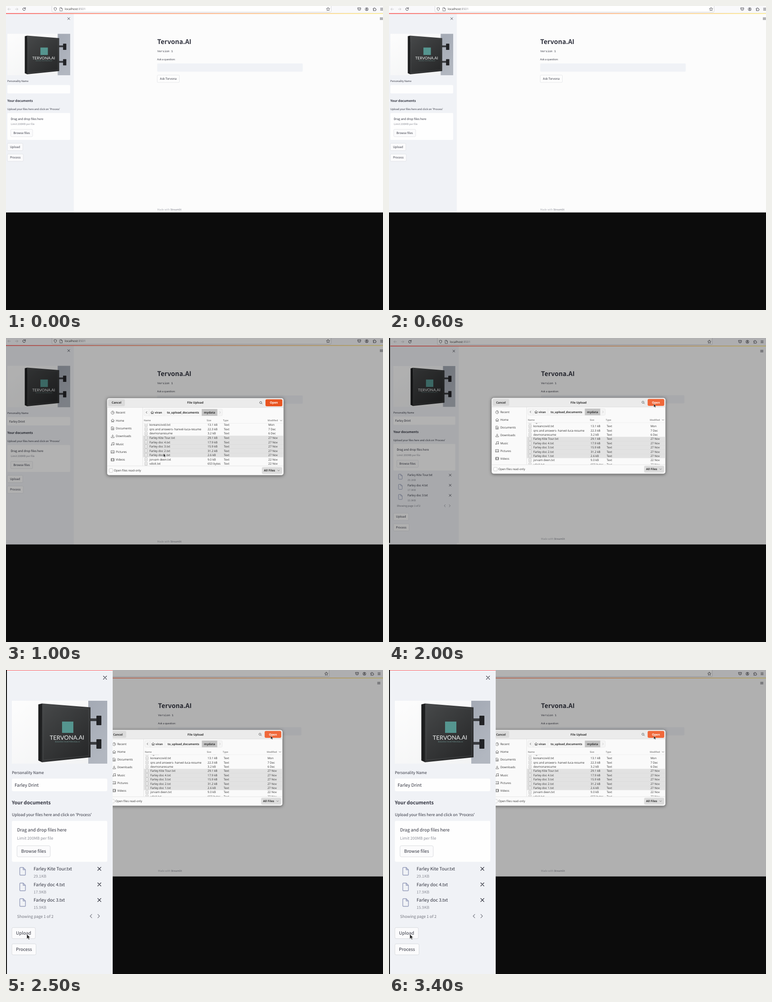
An HTML page that plays this animation: 834x672 px, repeating every 4 s.

```html
<!DOCTYPE html>
<html lang="en">
<head>
<meta charset="utf-8">
<title>File upload demo</title>
<style>
html, body { margin: 0; width: 100%; height: 100%; overflow: hidden; background: #0c0c0c; }
#stage { display: block; width: 834px; height: 672px; text-rendering: geometricPrecision; }
text { fill: #31333f; }
.app { font-family: "Noto Sans CJK JP", "Noto Sans CJK SC", "Noto Sans CJK KR", "Noto Sans CJK TC", "Noto Sans CJK", "Open Sans", sans-serif; }
.sys { font-family: "Open Sans", "Noto Sans", sans-serif; fill: #2e2e2e; }
.mono { font-family: "Liberation Mono", "Noto Sans Mono", monospace; }
.sign { font-family: Lato, "Open Sans", sans-serif; }
.line { fill: none; stroke-linecap: round; stroke-linejoin: round; }
.dialog { filter: drop-shadow(0 1px 3.5px rgba(0,0,0,.5)); }
</style>
</head>
<body>
<svg id="stage" viewBox="0 0 834 672"></svg>
<script>
const INK = '#31333f', GREY = '#8d8f98', BLACK = '#0c0c0c';

const rect = (x, y, w, h, fill, r = 0, more = '') =>
  `<rect x="${x}" y="${y}" width="${w}" height="${h}" rx="${r}" fill="${fill}" ${more}/>`;
const line = (d, stroke = INK, w = 1) =>
  `<path class="line" d="${d}" stroke="${stroke}" stroke-width="${w}"/>`;
const text = (cls, x, y, size, str, more = '') =>
  `<text class="${cls}" x="${x}" y="${y}" font-size="${size}" ${more}>${str}</text>`;
const app = (...a) => text('app', ...a);
const sys = (...a) => text('sys', ...a);
const at = (x, y, s, body) => `<g transform="translate(${x} ${y}) scale(${s})">${body}</g>`;
const ink = c => `style="fill:${c}"`;
const BOLD = 'font-weight="700"';
const MID = BOLD + ' text-anchor="middle"';

const cross = (x, y, r) => line(`M${x - r} ${y - r}l${2 * r} ${2 * r}m0 ${-2 * r}l${-2 * r} ${2 * r}`, INK, 1.3);
const chevron = (x, y, dx, color, w = 1) =>
  line(`M${x - dx} ${y - 2 * Math.abs(dx)}L${x + dx} ${y}L${x - dx} ${y + 2 * Math.abs(dx)}`, color, w);
const down = (x, y) => line(`M${x - 2} ${y - 1}l2 2l2 -2`, '#555', .7);
const cursor = (x, y, s) => at(x, y, s,
  '<path d="M0 0V10.5L2.5 8.3L4.2 12L6 11.2L4.4 7.6H7.6Z" fill="#222" stroke="#eee" stroke-width=".7"/>');

const files = [
  ['Farley Kite Tour.txt', '29.1', '27 Nov'],
  ['Farley doc 4.txt', '17.9', '27 Nov'],
  ['Farley doc 3.txt', '15.9', '27 Nov'],
  ['Farley doc 2.txt', '31.2', '27 Nov'],
  ['Farley doc 1.txt', '2.6', '27 Nov']
];
const listing = [
  ['log.txt', '4.1 kB', 'Mon'],
  ['koreancovid.txt', '13.1 kB', 'Mon'],
  ['qns and answers- hanvel-luca-resume', '22.3 kB', '7 Dec'],
  ['devmonaresume', '3.2 kB', '6 Dec'],
  ...files.map(([n, s, d]) => [n, s + ' kB', d]),
  ['jorvam deen.txt', '9.0 kB', '22 Nov'],
  ['vdoit.txt', '653 bytes', '22 Nov']
];

function photo() {
  return rect(13, 68, 211, 139, 'url(#paper)') +
    rect(182, 68, 42, 139, 'url(#wall)') +
    [101, 153].map(y => rect(184, y + 6, 18, 6, '#3a3c40') + rect(200, y, 11, 21, '#222326', 1)).join('') +
    '<path d="M71.5 76L80 74V204L71.5 200Z" fill="#1d1e1f"/>' +
    '<path d="M80 74L187 82.5V193L79 204Z" fill="url(#face)"/>' +
    line('M84 79L183 86.5V189.500L83 199Z', '#4b4d4f', .8) +
    rect(124, 114, 25, 25, '#55958f') +
    text('sign', 135, 154, 13, 'TERVONA.AI', `text-anchor="middle" ${ink('#f2f4f4')} transform="rotate(-.5 135 154)"`) +
    text('sign', 136, 159.5, 3.9, 'BUILDING YOUR PERSONAL AI', `text-anchor="middle" ${ink('#6f9793')}`);
}

const button = (x, y, w, label) =>
  rect(x, y, w, 24.5, '#fbfbfc', 3, 'stroke="#d5d7dc" stroke-width=".9"') + app(x + 9, y + 15.6, 9.9, label);

function sidebar(name, uploaded) {
  const shift = uploaded ? 0 : -134;
  let s = rect(2, -1, 234, 680, '#f0f2f6') + cross(219, 17, 3.6) + photo() +
    app(13, 229.9, 8.6, 'Personality Name') +
    rect(13, 240, 211, 28, '#fefefe', 3) + app(19, 257.8, 9.9, name) +
    app(13, 296.7, 10.75, 'Your documents', BOLD) +
    app(13, 323.1, 8.7, "Upload your files here and click on 'Process'") +
    rect(13, 333.5, 211, 90.5, '#fefefe', 3) +
    app(24.5, 356.8, 9.9, 'Drag and drop files here') +
    app(24.5, 374.6, 8.7, 'Limit 200MB per file', ink(GREY)) +
    button(24.4, 388.5, 73.5, 'Browse files');
  if (uploaded) {
    files.slice(0, 3).forEach(([n, size], i) => {
      const y = 439.5 + i * 34.5;
      s += line(`M32 ${y - 3}h6l5 5v10.5q0 1.5 -1.5 1.5h-9.5q-1.5 0 -1.5 -1.5v-14q0 -1.5 1.5 -1.5M38 ${y - 3}v5h5`, '#939bb9', 1.4) +
        app(61, y + 3.7, 9.9, n) +
        app(61, y + 19.6, 8.7, size + 'KB', ink(GREY)) + cross(206.5, y, 3.5);
    });
    s += app(24.5, 547.6, 8.7, 'Showing page 1 of 2', ink('#73757f')) +
      chevron(188, 544, -1.9, '#73757f', 1.1) + chevron(205, 544, 1.9, '#73757f', 1.1);
  }
  return s + button(13, 569.3 + shift, 52, 'Upload') + button(13, 605.3 + shift, 53.5, 'Process');
}

function toolbar() {
  const dark = '#3d3d45', pale = '#c2c2c6';
  return rect(-4.2, -6, 860, 21.8, '#f9f9fb') + rect(-4.2, 15.2, 860, .6, '#e6e6ea') +
    rect(101.7, -6, 617.5, 19.5, '#fff', 2, 'stroke="#c4c4ca" stroke-width=".7"') +
    line('M10 7H4m2.5 -2.5L4 7l2.5 2.5M20.5 7h6m-2.5 -2.5l2.5 2.5l-2.5 2.5', pale, .9) +
    line('M42.5 5.2A3 3 0 1 0 43 7.5M43 3.5v2.2h-2.3', dark) +
    line('M109 3.6l2.8 1q.2 4.2 -2.8 6q-3 -1.8 -2.8 -6Z', dark, .8) +
    line('M119.5 3.8h3l2 2v5h-5ZM122.3 3.8v2.2h2.2', dark, .7) +
    sys(130, 9.4, 6.85, 'localhost<tspan fill="#8a8a90">:8501</tspan>') +
    line('M712.5 3.2l1.15 2.4l2.6 .35l-1.9 1.8l.5 2.6l-2.35 -1.25l-2.35 1.25l.5 -2.6l-1.9 -1.8l2.6 -.35Z', dark, .8) +
    line('M778.3 4h6.4v2.5a3.2 3.2 0 0 1 -6.4 0ZM780 6l1.5 1.5l1.5 -1.5', dark, .9) +
    `<circle cx="798" cy="7" r="3.4" fill="none" stroke="${dark}" stroke-width=".8"/><circle cx="798" cy="6" r="1.3" fill="${dark}"/>` +
    line('M796 9q2 -1.8 4 0', dark) +
    line('M812.5 5.3h1.7a1 1 0 1 1 1.6 0h1.9v1.9a1 1 0 1 1 0 1.6v1.7h-5.2v-1.9a1 1 0 1 0 0 -1.5Z', dark, .8) +
    line('M828.3 4.7h5.4m-5.4 2.3h5.4m-5.4 2.3h5.4', dark, .8);
}

function page(name, uploaded) {
  return rect(-4.2, -6, 860, 475, '#fcfcfc') +
    at(-5.56, 16.7, .6588, sidebar(name, uploaded)) + toolbar() +
    rect(-4.2, 15.9, 860, 1.5, 'url(#rainbow)') +
    line('M827.4 26h6m-6 2h6m-6 2h6', '#55575f', .9) +
    app(334.6, 83.8, 14.25, 'Tervona.AI', BOLD) +
    text('mono', 334.8, 102, 6.4, 'Version 1') +
    app(334.6, 120.2, 5.73, 'Ask a question:') +
    rect(334.5, 127, 322, 18.2, '#f0f2f6', 1.8) +
    rect(334.5, 152.7, 49, 16.2, '#fdfdfd', 2, 'stroke="#d5d7dc" stroke-width=".6"') +
    app(359, 163.1, 6.5, 'Ask Tervona', 'text-anchor="middle"') +
    app(334.6, 451.6, 5.73, 'Made with <tspan fill="#7c7e88" font-weight="500">Streamlit</tspan>', ink('#a9abb2'));
}

const places = [
  ['Recent', 'M4 .5a3.5 3.5 0 1 1 -.1 0M4 2v2.2h1.8'],
  ['Home', 'M.5 4L4 .7L7.5 4M1.5 3.5V7.3h1.8v-2h1.4v2h1.8V3.5'],
  ['Documents', 'M1.3 .7h3.7l1.7 1.7v5h-5.4ZM2.7 4h2.6m-2.6 1.7h2.6'],
  ['Downloads', 'M4 .7v4.3m-1.9 -1.8L4 5l1.9 -1.8M.8 5.5v1.8h6.4v-1.8'],
  ['Music', 'M2.5 6V1.3l4.5 -.8v4.7M2.5 6a1 1 0 1 1 -.1 -.3M7 5.3a1 1 0 1 1 -.1 -.3'],
  ['Pictures', 'M.7 1.2h6.6v5.6h-6.6ZM1 6l2 -2.3l1.5 1.5l1.2 -1l1.5 1.6'],
  ['Videos', 'M.8 1.2h6.4v5.6h-6.4ZM2.2 1.2v5.6M5.8 1.2v5.6M.8 4h1.4m3.6 0h1.4']
];

function rows(scroll) {
  const pitch = 9.55, top = 182.45 + scroll;
  const body = rect(302.5, top + 3.5 * pitch, 311.5, 5 * pitch, '#e2e2e2') +
    listing.map(([n, size, date], i) => {
      const y = top + i * pitch, base = y + 2.3;
      return (i > 4 && i < 9 ? rect(302.5, y - pitch / 2, 311.5, .4, '#d3d3d3') : '') +
        rect(307, y - 3.5, 5.6, 7, '#fff', .6, 'stroke="#999" stroke-width=".6"') +
        line(`M308.5 ${y - 1.2}h2.6m-2.6 1.4h2.6m-2.6 1.4h2.6`, '#aaa', .5) +
        sys(317.3, base, 6.5, n) + sys(446, base, 6.4, size) +
        sys(482, base, 6.4, 'Text') + sys(580.3, base, 6.4, date);
    }).join('');
  return `<g clip-path="url(#list)">${body}</g>`;
}

function dialog(scroll, openColor) {
  const head = (x, s) => sys(x, 184.3, 5.3, s, `font-weight="600" ${ink('#777')}`);
  return '<g class="dialog">' + rect(223.3, 132.8, 391, 170.6, '#fafafa', 5, 'stroke="#8b8b8b" stroke-width=".7"') + '</g>' +
    '<path d="M223.6 153.2V138a5 5 0 0 1 5 -5H609a5 5 0 0 1 5 5V153.2Z" fill="#ebebeb"/>' +
    rect(223.6, 153, 390.4, .6, '#d0d0d0') +
    rect(226, 135.5, 37, 15.2, '#dadada', 3) + sys(244.5, 145.4, 6.5, 'Cancel', MID) +
    sys(418.8, 145.4, 6.5, 'File Upload', MID) +
    line('M565 144.4a2.3 2.3 0 1 1 .1 -.1l1.7 1.7', '#444', .9) +
    rect(574, 135.5, 37.3, 15.4, openColor, 3) + sys(592.6, 145.4, 6.6, 'Open', MID + ' ' + ink('#fff')) +
    places.map(([n, d], i) => at(232, 161 + i * 17.35, 1, line(d, '#555', .8) + sys(11, 6.3, 6.5, n))).join('') +
    rect(302, 153.5, .6, 129, '#d8d8d8') +
    rect(305, 157, 174, 15, '#f5f5f5', 3, 'stroke="#e0e0e0" stroke-width=".5"') +
    rect(316.6, 157, .5, 15, '#ddd') + rect(349.5, 157, .5, 15, '#e4e4e4') +
    rect(433, 157, 34.6, 15, '#c4c4c4') +
    chevron(310.8, 164.5, -1, '#444', .9) + chevron(473.6, 164.5, 1, '#bbb', .9) +
    at(320, 161, .88, line(places[1][1], '#333', .9)) +
    sys(329, 166.8, 6.3, 'viran', BOLD) +
    sys(391.5, 166.8, 6.5, 'to_upload_documents', MID) +
    sys(450.3, 166.8, 6.5, 'mydata', MID) +
    head(305, 'Name') + head(444, 'Size') + head(480, 'Type') + head(578.8, 'Modified') + down(608.5, 182.5) +
    rect(302.5, 188.2, 311.5, .5, '#e2e2e2') + rows(scroll) +
    rect(223.6, 282.6, 390.4, .6, '#d4d4d4') +
    rect(228.2, 288.9, 8, 8, '#fff', 1.5, 'stroke="#b5b5b5" stroke-width=".7"') +
    sys(238.8, 295.3, 6.4, 'Open files read-only') +
    rect(566, 285.5, 45, 15, '#dcdcdc', 3) + sys(570.5, 295.3, 6.5, 'All Files', BOLD) + down(603, 293);
}

const shade = rect(-4.2, -6, 860, 475, '#000', 0, 'fill-opacity=".3"');
const edge = rect(0, 456.4, 834, 2, BLACK);
const layer = (w, h, body) => `<g class="layer"><svg width="${w}" height="${h}">${body}</svg></g>`;
const NAME = 'Farley Drint';

document.getElementById('stage').innerHTML = `
  <defs>
    <linearGradient id="rainbow"><stop stop-color="#ff4b4b"/><stop offset="1" stop-color="#fff080"/></linearGradient>
    <linearGradient id="paper" x2="1" y2="1"><stop stop-color="#fdfdfd"/><stop offset="1" stop-color="#f1f2f3"/></linearGradient>
    <linearGradient id="wall" x2=".4" y2="1"><stop stop-color="#a3a9b4"/><stop offset="1" stop-color="#b2b7c0"/></linearGradient>
    <linearGradient id="face" x2=".7" y2="1"><stop stop-color="#47494a"/><stop offset="1" stop-color="#28292a"/></linearGradient>
    <clipPath id="list"><rect x="302.5" y="189.2" width="311.5" height="93.4"/></clipPath>
  </defs>` +
  rect(0, 0, 834, 672, BLACK) +
  layer(834, 457, page('', false) + edge) +
  layer(834, 457, page(NAME, false) + shade + dialog(0, '#e95420') + cursor(348.3, 255.5, .7) + edge) +
  layer(834, 453, rect(0, 0, 834, 453, BLACK) +
    at(6.8, 1.4, .985, page(NAME, true) + shade + dialog(4.5, '#f0683a') + cursor(587.8, 146.5, .7))) +
  layer(236, 672, rect(0, 0, 236, 672, BLACK) + sidebar(NAME, true) +
    rect(2, 0, 234, 1, '#ff5a5a') + cursor(46, 584, 1));

// Each layer appears at its start time and stays until the loop restarts.
const LOOP = 4000, starts = [0, 1000, 2000, 2500];
document.querySelectorAll('.layer').forEach((el, i) => {
  if (!starts[i]) return;
  el.animate([
    { opacity: 0, offset: 0, easing: 'step-end' },
    { opacity: 1, offset: starts[i] / LOOP, easing: 'step-end' },
    { opacity: 1, offset: 1 }
  ], { duration: LOOP, iterations: Infinity });
});
</script>
</body>
</html>
```
